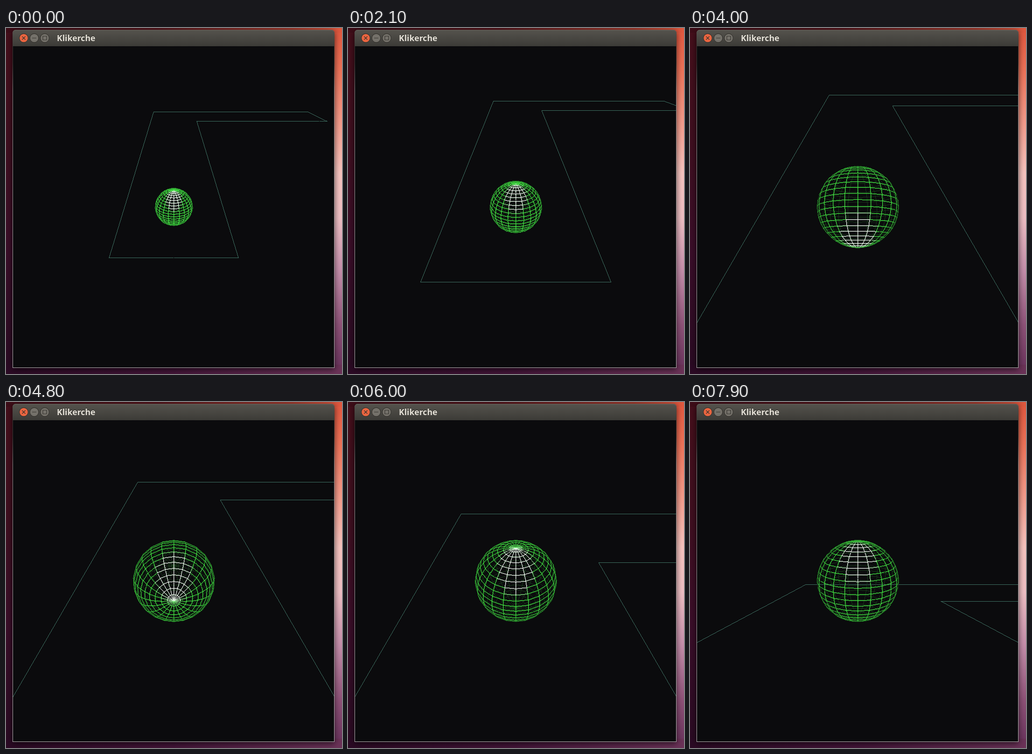
An HTML page with a canvas for the animation above (8 s loop, 720 by 740 pixels).

```html
<!DOCTYPE html>
<html lang="mk">
<head>
<meta charset="utf-8">
<title>Klikerche</title>
<style>
html, body { margin: 0; width: 100%; height: 100%; overflow: hidden; }
body { position: relative; background: #34102a; }
body > *, .bar > * { position: absolute; box-sizing: border-box; }
.desk {
  left: 0; top: 0; width: 720px; height: 740px;
  background:
    linear-gradient(90deg, #3d0d18 0%, #54161d 45%, #a23c30 85%, #e0593f 100%) 0 0 / 720px 10px no-repeat,
    linear-gradient(90deg, #2b0a24 0%, #431538 50%, #6b3358 100%) 0 720px / 720px 20px no-repeat,
    linear-gradient(#e0563e 0%, #ec7258 12%, #f49d8d 28%, #f6c4bf 42%, #eebfc4 55%, #c58fab 70%, #8e5278 86%, #66305a 100%) 690px 0 / 30px 740px no-repeat,
    linear-gradient(#450f1b 0%, #3f0f20 35%, #3a0e29 65%, #290a22 100%) 0 0 / 30px 740px no-repeat;
}
.win {
  left: 14px; top: 4px; width: 690px; height: 723px;
  border-radius: 7px 7px 0 0;
  background: linear-gradient(#34332f 0, #3b3a37 70px, #8d8b8b 130px, #b5b2b2 100%);
  box-shadow: 0 3px 13px rgba(0, 0, 0, .65);
}
.bar {
  left: 14px; top: 4px; width: 690px; height: 35px;
  border-radius: 7px 7px 0 0;
  background: linear-gradient(#55534d, #3c3b37);
  box-shadow: inset 0 1px #68665f;
}
.bar svg { left: 0; top: 0; }
.bar span {
  left: 95px; top: 4px;
  font: bold 17.6px/26px "Noto Sans", "Open Sans", sans-serif;
  color: #e6e2d9; text-shadow: 0 -1px #26251f;
}
canvas { left: 0; top: 0; }
</style>
</head>
<body>
<div class="desk"></div>
<div class="win"></div>
<div class="bar">
  <svg width="100" height="35" fill="none" stroke="#35332e" stroke-width="1.2">
    <circle cx="24" cy="17.5" r="9.4" fill="#ea6540"/>
    <circle cx="46.5" cy="17.5" r="9.4" fill="#74716a"/>
    <circle cx="69" cy="17.5" r="9.4" fill="#74716a"/>
    <path d="M20.5 14l7 7m0-7l-7 7M42 17.5h9M65 13.5h8v8h-8z"/>
  </svg>
  <span>Klikerche</span>
</div>
<canvas width="720" height="740"></canvas>
<script>
const ctx = document.querySelector('canvas').getContext('2d');
const LOOP = 8000, FOCAL = 596, CX = 359, CY = 382, PARTS = 22, NEAR = 0.1;
const RAD = Math.PI / 180;

// Key values over simulation steps (or travelled distance for GLOW)
const DIST = [[0, 15], [1, 14.94], [3, 13.49], [7, 10.86], [11, 8.51], [12, 7.85], [13, 7.22], [14, 6.93]];
const TRAVEL = [[16, 0], [17, 0.2], [19, 1.6], [22, 4.88], [28, 11.85], [31, 15.2], [35, 19.3], [38, 20.95]];
const PITCH = [[38, 30], [42, 24.6], [52, 4.9]];
const GLOW = [[0, -21], [4.88, 37], [11.85, -6], [20.95, -15]];

// L-shaped track on the ground, as x and z
const TRACK = [[-3, 3], [-3, -30], [20, -30], [20, -24], [3, -24], [3, 3]];

const clamp = (v, lo = 0, hi = 1) => Math.max(lo, Math.min(hi, v));

function at(keys, x) {
  if (x <= keys[0][0]) return keys[0][1];
  for (let i = 1; i < keys.length; i++) {
    const [x0, y0] = keys[i - 1], [x1, y1] = keys[i];
    if (x <= x1) return y0 + (y1 - y0) * (x - x0) / (x1 - x0);
  }
  return keys[keys.length - 1][1];
}

// The simulation advances on four of every five ticks, with one pause
function stepAt(ms) {
  const tick = Math.floor(ms / 100);
  let n = 0;
  for (let k = 14; k <= tick; k++) if (k % 5 !== 2 && k !== 61) n++;
  return n;
}

const project = p => [CX + FOCAL * p[0] / p[2], CY - FOCAL * p[1] / p[2]];

// Stepped line without smoothing, as a plain rasteriser draws it
function line([x0, y0], [x1, y1], width) {
  const dx = x1 - x0, dy = y1 - y0;
  const flat = Math.abs(dx) > Math.abs(dy);
  const n = Math.max(1, Math.round(Math.max(Math.abs(dx), Math.abs(dy))));
  for (let i = 0; i <= n; i++) {
    const x = Math.round(x0 + dx * i / n), y = Math.round(y0 + dy * i / n);
    if (x < 0 || x > 720 || y < 0 || y > 740) continue;
    ctx.fillRect(x, y, flat ? 1 : width, flat ? width : 1);
  }
}

function drawTrack(dist, pitch, travel) {
  const s = Math.sin(pitch), c = Math.cos(pitch);
  const pts = TRACK.map(([x, z0]) => {
    const z = z0 + travel;
    return [x, -c - z * s, dist + s - z * c];
  });
  const cut = (a, b) => {
    if (a[2] >= NEAR) return a;
    const k = (NEAR - a[2]) / (b[2] - a[2]);
    return a.map((v, i) => v + (b[i] - v) * k);
  };
  ctx.fillStyle = '#3f7163';
  pts.forEach((a, i) => {
    const b = pts[(i + 1) % pts.length];
    if (a[2] < NEAR && b[2] < NEAR) return;
    line(project(cut(a, b)), project(cut(b, a)), 1);
  });
}

// Green by angle to the viewer, with a white highlight `glow` degrees below centre
function shade(n, dist, glow) {
  const facing = n[2] - 1 / dist;
  if (facing < -0.02) return [23, 58, 25];
  const lit = clamp(0.2 + facing * 1.5);
  const up = (Math.asin(clamp(n[1], -1)) / RAD + glow) / 34;
  const side = Math.asin(clamp(n[0], -1)) / RAD / 23;
  const w = clamp((1.1 - Math.hypot(up, side)) * 4);
  return [[36, 66, 238], [120, 228, 248], [38, 66, 238]]
    .map(([lo, hi, white]) => Math.round((lo + (hi - lo) * lit) * (1 - w) + white * w));
}

function drawBall(dist, tilt, glow) {
  const s = Math.sin(tilt), c = Math.cos(tilt);
  const vertex = (i, j) => {
    const lat = i * Math.PI / PARTS, lon = j * 2 * Math.PI / PARTS;
    const x = Math.sin(lat) * Math.sin(lon), y = Math.cos(lat), z = Math.sin(lat) * Math.cos(lon);
    return [x, y * c - z * s, y * s + z * c];
  };
  const segs = [];
  const add = (a, b) => {
    const n = a.map((v, k) => (v + b[k]) / 2);
    segs.push({ a, b, z: n[2], color: shade(n, dist, glow) });
  };
  for (let i = 0; i < PARTS; i++) {
    for (let j = 0; j < PARTS; j++) {
      const v = vertex(i, j);
      add(v, vertex(i + 1, j));
      if (i) add(v, vertex(i, j + 1));
    }
  }
  segs.sort((p, q) => p.z - q.z);
  const spot = p => project([p[0], p[1], dist - p[2]]);
  for (const { a, b, z, color } of segs) {
    ctx.fillStyle = `rgb(${color})`;
    line(spot(a), spot(b), z < 0 ? 1 : 1.35);
  }
}

function draw(step) {
  const dist = at(DIST, step), travel = at(TRAVEL, step), deg = at(PITCH, step);
  ctx.save();
  ctx.beginPath();
  ctx.rect(15, 39, 688, 687);
  ctx.clip();
  ctx.fillStyle = '#0b0b0d';
  ctx.fillRect(15, 39, 688, 687);
  drawTrack(dist, deg * RAD, travel);
  drawBall(dist, (deg - 8 * travel) * RAD, at(GLOW, travel) - (30 - deg) / 2);
  ctx.restore();
}

let shown = -1;
function frame() {
  const step = stepAt(performance.now() % LOOP);
  if (step !== shown) draw(shown = step);
  requestAnimationFrame(frame);
}
frame();
</script>
</body>
</html>
```
